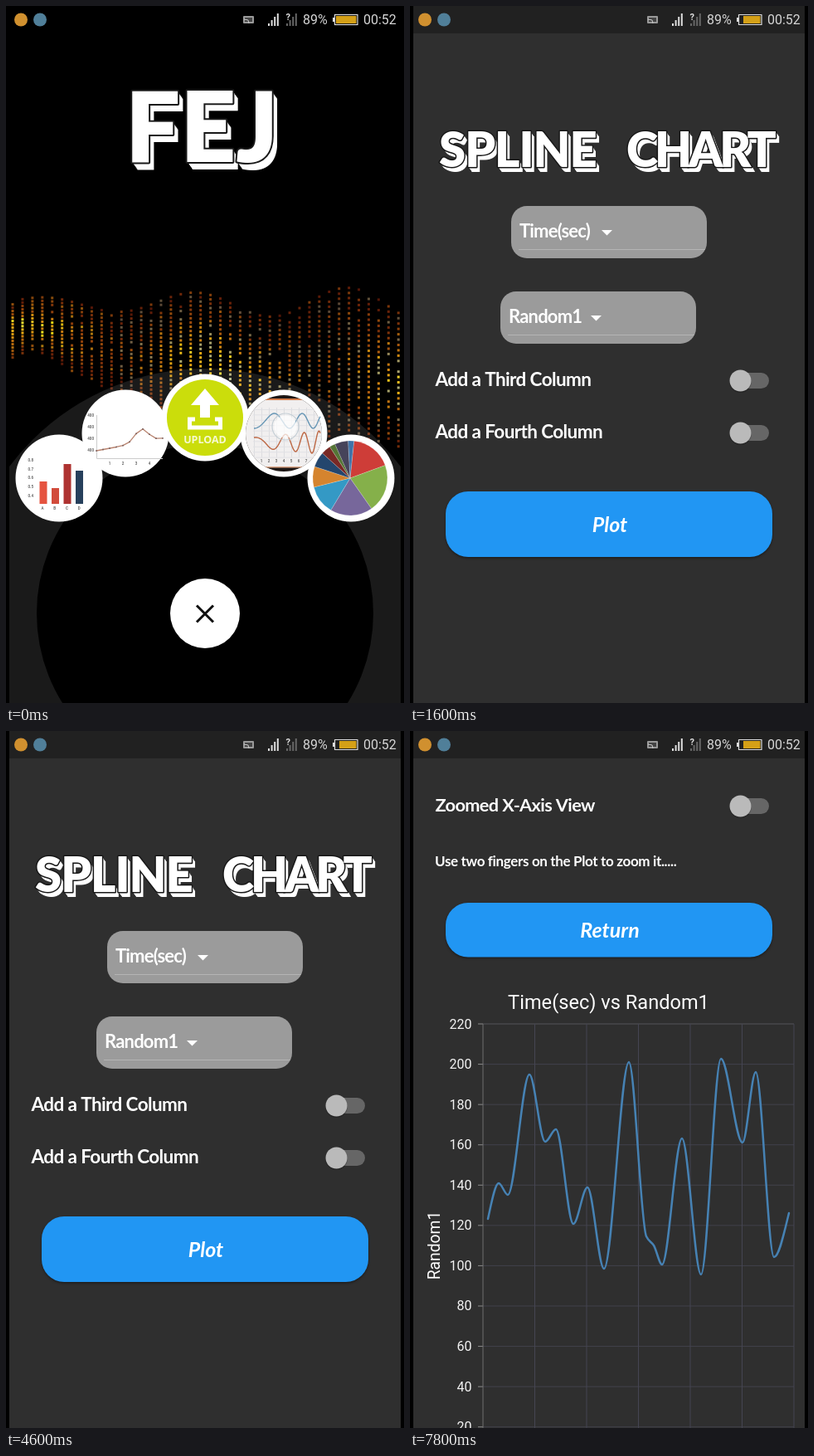
Animation, 480 px wide and 840 px high, one loop 8000 ms. Source, as an HTML page with a canvas:

```html
<!DOCTYPE html>
<html lang="en">
<head>
<meta charset="utf-8">
<title>Chart app</title>
<style>
  html, body { margin: 0; width: 100%; height: 100%; overflow: hidden; background: #000; }
  canvas { display: block; width: 480px; height: 840px; }
</style>
</head>
<body>
<canvas id="stage" width="480" height="840"></canvas>
<script>
const g = document.getElementById('stage').getContext('2d');
const LOOP = 8000, STEP = 200, TAU = Math.PI * 2;
const UI = 'Roboto, sans-serif', HAND = 'Lato, sans-serif';

function rect(x, y, w, h, color) {
  g.fillStyle = color;
  g.fillRect(x, y, w, h);
}

function disc(x, y, r, color) {
  g.fillStyle = color;
  g.beginPath();
  g.arc(x, y, r, 0, TAU);
  g.fill();
}

function pill(x, y, w, h, r, color) {
  g.fillStyle = color;
  g.beginPath();
  g.roundRect(x, y, w, h, r);
  g.fill();
}

function path(pts, color, width) {
  g.beginPath();
  pts.forEach(([x, y]) => g.lineTo(x, y));
  if (width) {
    g.strokeStyle = color;
    g.lineWidth = width;
    g.stroke();
  } else {
    g.fillStyle = color;
    g.fill();
  }
}

// Samples a formula at n + 1 even steps
function plot(x, step, n, f, color, width) {
  path(Array.from({ length: n + 1 }, (_, i) => [x + i * step, f(i)]), color, width);
}

function text(str, x, y, font, color = '#fff', align = 'left', spacing = 0) {
  g.font = font;
  g.fillStyle = color;
  g.textAlign = align;
  g.letterSpacing = spacing + 'px';
  g.fillText(str, x, y);
  g.letterSpacing = '0px';
}

const label = (str, x, y, size, spacing = -0.6) =>
  text(str, x, y, `700 ${size}px ${HAND}`, '#fff', 'left', spacing);

const tiny = (str, x, y, align = 'center') => text(str, x, y, `700 4.5px ${UI}`, '#666', align);

// Raised lettering: white extrusion, dark rim, white face
function blockText(str, x, y, size, depth, rim, spacing) {
  const font = `900 ${size}px ${HAND}`;
  for (let i = depth; i > 0; i--) text(str, x + i * 0.7, y + i, font, '#fff', 'left', spacing);
  g.letterSpacing = spacing + 'px';
  g.lineJoin = 'round';
  g.strokeStyle = '#181818';
  g.lineWidth = rim;
  g.strokeText(str, x, y);
  text(str, x, y, font, '#fff', 'left', spacing);
}

function clipped(shape, draw) {
  g.save();
  g.beginPath();
  shape();
  g.clip();
  draw();
  g.restore();
}

const hash = (a, b) => {
  const v = Math.sin(a * 127.1 + b * 311.7) * 43758.5453;
  return v - Math.floor(v);
};

function statusBar(t, bg) {
  rect(4, 0, 472, 33, bg);
  disc(18, 16.5, 8, '#d0902f');
  disc(41, 16.5, 8, '#507f99');

  pill(286, 12, 13, 9, 1, '#999');
  rect(288, 14, 9, 5, '#444');
  path([[287, 16], [292, 17], [293, 21]], '#ccc', 1);

  for (let i = 0; i < 4; i++) {
    const h = 3 + i * 4;
    rect(316 + i * 3.6, 24 - h, 2, h, '#ddd');
    rect(338 + i * 3.6, 24 - h, 2, h, '#666');
  }
  text('?', 337.5, 17, `700 11px ${UI}`, '#ddd');
  text('89%', 358, 22, `16px ${UI}`, '#d6d6d6');
  text('00:52', 431, 22, `16px ${UI}`, '#d6d6d6');

  // Battery pulses while charging
  const left = t % 2000 < 600 ? 398 : 402;
  g.strokeStyle = '#ddd';
  g.lineWidth = 1.2;
  g.strokeRect(396.5, 10.5, 27.5, 12);
  rect(394, 14, 2, 5, '#ddd');
  rect(left, 12, 422.5 - left, 9, '#d4a017');
}

function touch(x, y, rim) {
  disc(x, y, 17, 'rgba(255,255,255,.22)');
  disc(x, y, 13.5, 'rgba(255,255,255,.65)');
  if (rim) {
    g.strokeStyle = 'rgba(175,190,200,.7)';
    g.lineWidth = 1.2;
    g.beginPath();
    g.arc(x, y, 16, 0, TAU);
    g.stroke();
  }
}

/* Menu */
// Columns of sparks between two waves; a bright band swings through them
function wave(t) {
  const k = Math.min(1, t / 400);
  for (let c = 0; c < 40; c++) {
    const x = 8 + c * 11.93;
    const ripple = (6 + x / 32) * Math.cos((x - 225) * TAU / 185);
    const swell = 16 * Math.cos((x - 35) * TAU / 375);
    const top = 357 - (1 - k / 2) * ripple - k * swell;
    const bottom = 412 + 128 * Math.abs(Math.sin((x - 30) * TAU / 1480)) + k * 14 * Math.cos(x / 50);
    const gap = 4 + c / 16;
    for (let y = top, r = 0; y < bottom; y += gap, r++) {
      const f = (y - top) / (bottom - top), n = hash(c, r + k * 9);
      if (n < 0.08) continue;
      const center = 0.5 + 0.35 * k * Math.cos(x / 62);
      const glow = Math.exp(-(((f - center) / 0.32) ** 2)) * (0.65 + 0.35 * Math.cos(x / 40));
      const hue = 10 + 32 * glow + 24 * n * n;
      const sat = n > 0.8 && x > 130 ? 25 : 85;
      rect(x - 1.5, y, 3, 3, `hsl(${hue} ${sat}% ${14 + 34 * glow + 14 * n}%)`);
    }
  }
}

function barIcon() {
  [[27, '#e5533f'], [19, '#d24b3b'], [48, '#ae3331'], [40, '#27405c']].forEach(([h, color], i) => {
    rect(40.5 + i * 14.5, 600 - h, 9, h, color);
    tiny('ABCD'[i], 44 + i * 14.7, 607);
  });
  for (let i = 0; i < 5; i++) tiny('0.' + (8 - i), 33, 549 + i * 10.7, 'right');
}

function lineIcon() {
  path([[109.5, 493], [109.5, 545.5], [189, 545.5]], '#ccc', 1);
  const trend = i => 536 - 1.5 * i - 16 * Math.exp(-((i - 6.8) ** 2) / 2);
  plot(109, 8, 10, trend, '#b98470', 1.3);
  for (let i = 0; i < 11; i++) rect(108.2 + i * 8, trend(i) - 0.8, 1.6, 1.6, '#755d5a');
  for (let i = 0; i < 4; i++) {
    tiny('400', 106, 495 + i * 14, 'right');
    tiny(i + 1, 125 + i * 16, 553);
  }
}

function uploadIcon() {
  disc(240, 496, 46, '#cbdd0b');
  path([[240, 461], [257, 481], [246, 481], [246, 496], [234, 496], [234, 481], [223, 481]], '#fff');
  g.lineJoin = 'miter';
  path([[228, 498], [221.5, 498], [221.5, 508], [258.5, 508], [258.5, 498], [252, 498]], '#fff', 5);
  text('UPLOAD', 240, 527, '700 12.5px "Open Sans", sans-serif', '#f6f9d0', 'center');
}

function splineIcon() {
  clipped(() => g.arc(335, 515, 46, 0, TAU), () => {
    rect(285, 465, 100, 100, '#1c1614');
    rect(285, 473, 100, 82, '#f1efef');
    rect(285, 473, 100, 2, '#d27b4a');
    rect(285, 555, 100, 1.5, '#d9a384');
    for (let i = 0; i < 10; i++) {
      rect(299 + i * 9, 484, 1, 60, '#dddde0');
      rect(298, 486 + i * 6.4, 82, 1, '#e2e2e5');
      tiny(i, 299 + i * 9, 550);
    }
  });
  const blue = u => 500 + 9 * Math.cos(TAU * (1.3 + 1.05 * u) * u);
  const rust = u => 526 + (6 + 8 * u) * Math.cos(TAU * ((1.2 + 1.9 * u) * u - 0.5));
  plot(299, 1, 80, i => blue(i / 80), '#6796b5', 1.4);
  plot(299, 1, 80, i => rust(i / 80), '#bd6845', 1.4);
}

function pieIcon() {
  const slices = [[64, '#ce3d38'], [75, '#85b04a'], [66, '#77679b'], [45, '#3499c5'], [32, '#d5842e'],
    [24, '#24466d'], [15, '#792925'], [9, '#557536'], [21, '#46435a'], [9, '#3f73a8']];
  let a = -84;
  for (const [span, color] of slices) {
    g.fillStyle = color;
    g.beginPath();
    g.moveTo(415, 569);
    g.arc(415, 569, 45, a * TAU / 360, (a += span) * TAU / 360);
    g.closePath();
    g.fill();
    g.strokeStyle = 'rgba(255,255,255,.3)';
    g.lineWidth = 0.6;
    g.stroke();
  }
}

function menu(t) {
  statusBar(t, '#000');
  blockText('FEJ', 144, 188, 117, 9, 4, 0);
  wave(t);
  clipped(() => g.rect(4, 0, 472, 840), () => {
    g.strokeStyle = 'rgba(255,255,255,.1)';
    g.lineWidth = 92;
    g.beginPath();
    g.arc(240, 732, 249, 0, TAU);
    g.stroke();
  });
  [[64, 569], [144, 515], [335, 515], [416, 569], [240, 496]].forEach(([x, y]) => disc(x, y, 52.5, '#fff'));
  barIcon();
  lineIcon();
  uploadIcon();
  splineIcon();
  pieIcon();
  disc(240, 732, 42, '#fff');
  path([[230, 722.5], [250, 742.5]], '#111', 3);
  path([[250, 722.5], [230, 742.5]], '#111', 3);
  if (t < 200) touch(337, 507, true);
}

/* Shared widgets */
function page(t) {
  rect(4, 0, 472, 840, '#2f2f2f');
  statusBar(t, '#212121');
}

function toggle(y) {
  pill(390, y - 9.5, 43, 19, 9.5, '#666');
  disc(398.5, y + 1, 13.5, 'rgba(0,0,0,.2)');
  disc(398.5, y, 13, '#bababa');
}

function button(str, y, h, base) {
  g.save();
  g.shadowColor = 'rgba(0,0,0,.4)';
  g.shadowBlur = 3;
  g.shadowOffsetY = 1.5;
  pill(43, y, 394, h, 27, '#2196f3');
  g.restore();
  text(str, 241, base, `italic 700 25px ${HAND}`, '#fff', 'center');
}

function picker(str, x, y, t) {
  pill(x, y, 236, 63, 19, '#9b9b9b');
  rect(x + 9, y + 52, 225, 1, `rgba(255,255,255,${t < 1200 ? 0.12 : 0.25})`);
  label(str, x + 10, y + 37.5, 22, -0.8);
  path([[x + 109, y + 29], [x + 122, y + 29], [x + 115.5, y + 35.5]], '#fff');
}

/* Form */
function form(t) {
  page(t);
  blockText('SPLINE', 35, 194, 58, 6, 3, -1);
  blockText('CHART', 261, 194, 58, 6, 3, -4);
  picker('Time(sec)', 122, 241, t);
  picker('Random1', 109, 344, t);
  label('Add a Third Column', 30.5, 458, 22.5);
  label('Add a Fourth Column', 30.5, 521, 22.5);
  toggle(451.5);
  toggle(514.5);
  button('Plot', 585, 79, 634);
  if (t >= 4200 && t < 4600) touch(250, 627);
}

/* Chart */
const KNOTS = [
  [94, 588], [107, 545], [118, 559], [144, 414], [163, 495], [176, 480], [197, 594],
  [214, 550], [234, 648], [264, 399], [285, 609], [294, 620], [304, 643], [328, 491],
  [351, 655], [375, 395], [401, 496], [417, 411], [439, 634], [457, 581]
];

// Monotone spline: flat at every turn, harmonic slope elsewhere
function series() {
  const rise = KNOTS.slice(1).map(([x, y], i) => (y - KNOTS[i][1]) / (x - KNOTS[i][0]));
  const slope = KNOTS.map((_, i) => {
    const a = rise[i - 1], b = rise[i];
    if (a === undefined || b === undefined) return 1.4 * (a ?? b);
    return a * b > 0 ? 2 * a * b / (a + b) : 0;
  });
  g.strokeStyle = '#4682b4';
  g.lineWidth = 2.5;
  g.lineJoin = g.lineCap = 'round';
  g.beginPath();
  KNOTS.forEach(([x, y], i) => {
    if (!i) return g.moveTo(x, y);
    const [px, py] = KNOTS[i - 1], d = (x - px) / 3;
    g.bezierCurveTo(px + d, py + slope[i - 1] * d, x - d, y - slope[i] * d, x, y);
  });
  g.stroke();
  g.lineCap = 'butt';
}

function chart(t) {
  page(t);
  label('Zoomed X-Axis View', 30.5, 97, 21.7);
  label('Use two fingers on the Plot to zoom it.....', 30, 162.5, 17, -0.35);
  toggle(90.5);
  button('Return', 207, 65.5, 249);
  text('Time(sec) vs Random1', 239.5, 334.5, `23.6px ${UI}`, '#fff', 'center');

  for (let i = 0; i < 11; i++) {
    const y = 353 + i * 48.57;
    rect(88, y - 0.5, 375, 1, i ? '#41414b' : '#55555a');
    rect(82, y - 0.5, 6, 1, '#8a8a8a');
    text(220 - i * 20, 74.5, y + 5.5, `16px ${UI}`, '#f2f2f2', 'right');
  }
  for (let i = 0; i < 7; i++) rect(87.5 + i * 62.5, 353, 1, 487, i ? '#454552' : '#707070');

  g.save();
  g.translate(36, 620);
  g.rotate(-Math.PI / 2);
  text('Random1', 0, 0, `19.3px ${UI}`, '#fff', 'center');
  g.restore();

  // Series is uncovered from the left, slowing down
  const k = Math.min(1, Math.max(0, (t - 4950) / 1200));
  const shown = 1 - (1 - k) ** 2;
  if (shown) clipped(() => g.rect(88, 353, 375 * shown, 487), series);
}

function draw(now) {
  const t = Math.floor((now % LOOP) / STEP) * STEP;
  rect(0, 0, 480, 840, '#000');
  if (t < 600) menu(t);
  else if (t < 4800) form(t);
  else chart(t);
}

const start = performance.now();
function tick() {
  draw(performance.now() - start);
  requestAnimationFrame(tick);
}
tick();
</script>
</body>
</html>
```
